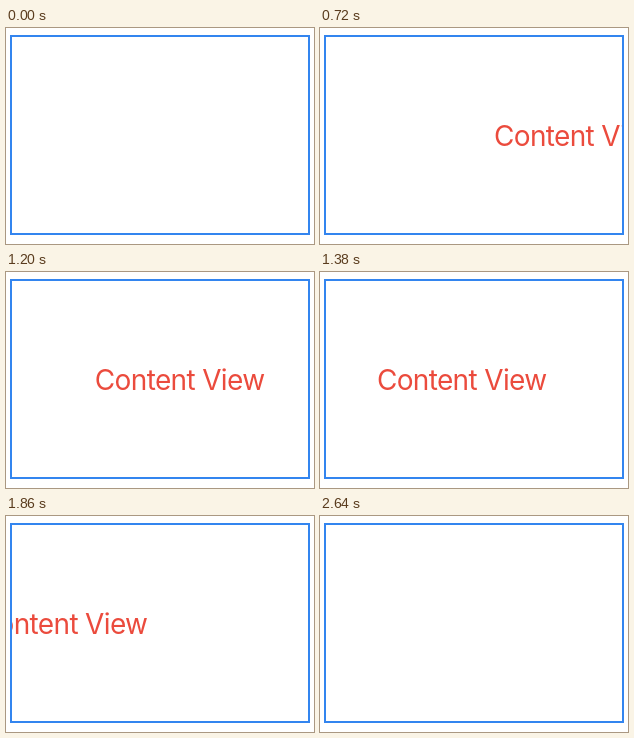
Write an HTML page that moves like this. It is 308x216 px and loops after 2700 ms.

```html
<!DOCTYPE html>
<html lang="en">
<head>
<meta charset="utf-8">
<title>Marquee</title>
<style>
  html, body { margin: 0; width: 100%; height: 100%; overflow: hidden; background: #fff; }
  svg { display: block; width: 100%; height: 100%; }
  text { font: 400 28px Inter, Roboto, sans-serif; letter-spacing: -0.65px; fill: #eb4b3d; }
</style>
</head>
<body>
<svg viewBox="0 0 308 216">
  <clipPath id="box"><rect x="4" y="7" width="300" height="200"/></clipPath>
  <g clip-path="url(#box)"><text id="label" y="117.5">Content View</text></g>
  <rect x="5" y="8" width="298" height="198" fill="none" stroke="#3385ef" stroke-width="2"/>
</svg>
<script>
  const LOOP = 2700, STEP = 60;
  const START = 301.7, SPEED = 0.1774; // px, px per ms
  const label = document.getElementById('label');
  const origin = performance.now();

  function draw(ms) {
    const t = Math.floor((ms % LOOP) / STEP) * STEP;
    label.setAttribute('x', (START - SPEED * t).toFixed(2));
  }

  function tick() {
    draw(performance.now() - origin);
    requestAnimationFrame(tick);
  }
  tick();
</script>
</body>
</html>
```
